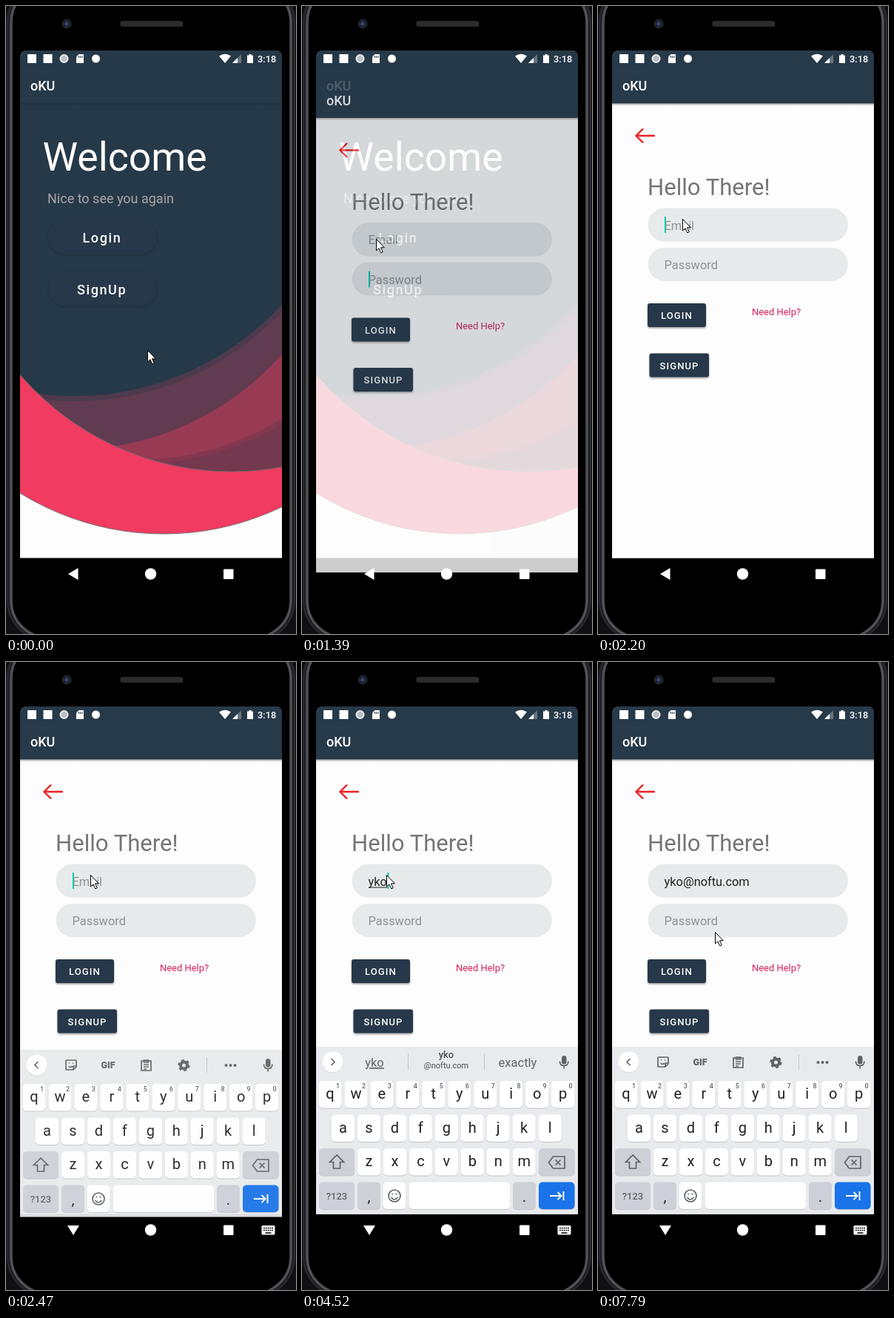
Recreate the animation shown at these times as an HTML page. Size 392 by 847 pixels, loop 8000 ms.

```html
<!DOCTYPE html>
<html lang="en">
<head>
<meta charset="utf-8">
<title>Login screen</title>
<style>
  html, body { margin: 0; width: 100%; height: 100%; overflow: hidden; background: #000; }
  svg { display: block; width: 100vw; height: 100vh; }
  text { font-family: Roboto, sans-serif; white-space: pre; }
  .mid { text-anchor: middle; }
  .med { font-weight: 500; }
  .caps { font-size: 13px; font-weight: 500; letter-spacing: 1.1px; fill: #fff; }
  .pill { font-size: 18px; font-weight: 500; letter-spacing: 1.6px; fill: #fff; }
  .field { font-size: 16.4px; }
  .hint { fill: #8f9394; }
  .key { font-size: 20px; fill: #202124; text-anchor: middle; }
  .digit { font-size: 9px; fill: #5f6368; text-anchor: middle; font-weight: 500; }
  .word { font-size: 16.5px; fill: #5f6368; text-anchor: middle; }
  .line { fill: none; stroke: #5f6368; stroke-width: 1.7; }
</style>
</head>
<body>
<svg viewBox="0 0 392 847">
  <defs>
    <clipPath id="screen"><path d="M19 744.500V70q0-10 10-10h334q10 0 10 10v674.500z"/></clipPath>
    <clipPath id="bowl"><circle cx="305" cy="250" r="378"/></clipPath>
    <linearGradient id="shade" x2="0" y2="1">
      <stop stop-color="#000" stop-opacity=".3"/><stop offset="1" stop-color="#000" stop-opacity="0"/>
    </linearGradient>
    <filter id="drop" x="-10%" y="-20%" width="120%" height="160%">
      <feDropShadow dx="0" dy="1.5" stdDeviation="1.2" flood-opacity=".4"/>
    </filter>
    <filter id="faint" x="-10%" y="-20%" width="120%" height="160%">
      <feDropShadow dx="0" dy=".7" stdDeviation=".8" flood-opacity=".28"/>
    </filter>
  </defs>

  <!-- phone body -->
  <rect width="392" height="847" fill="#101014"/>
  <rect x="2" y="-32" width="388" height="888" rx="54" fill="#1d1d22" stroke="#2a2a30" stroke-width="2"/>
  <rect x="7" y="-28" width="378" height="880" rx="50" fill="#000" stroke="#505057" stroke-width="3.500"/>
  <circle cx="82" cy="24" r="6" fill="#1b2130" stroke="#2b2d35"/>
  <circle cx="82" cy="24" r="2.500" fill="#34486b"/>
  <rect x="154.500" y="20" width="85" height="8" rx="3.500" fill="#2b2b2d"/>

  <!-- welcome -->
  <g clip-path="url(#screen)">
    <rect x="19" y="60" width="354" height="685" fill="#fdfdfd"/>
    <circle cx="213" cy="342.400" r="369.600" fill="#f23b60" stroke="#777"/>
    <g clip-path="url(#bowl)">
      <rect x="19" y="60" width="354" height="685" fill="#74384f"/>
      <circle cx="176" cy="234" r="384" fill="#83384f"/>
      <circle cx="176" cy="234" r="378" fill="#983a54"/>
      <circle cx="89" cy="220" r="378" fill="#613b4f"/>
      <circle cx="93" cy="148" r="385" fill="#4d3a4d"/>
      <circle cx="93" cy="148" r="378" fill="#263948"/>
    </g>
    <circle cx="305" cy="250" r="378" fill="none" stroke="#6f6670"/>
    <rect x="19" y="131" width="354" height="4" fill="url(#shade)" opacity=".6"/>
    <text class="med" x="33" y="114" font-size="18" fill="#fff">oKU</text>
    <text x="49.500" y="222" font-size="53.600" fill="#fff">Welcome</text>
    <text x="56" y="266" font-size="18" fill="#aaa4a6">Nice to see you again</text>
    <g fill="#263948" filter="url(#faint)">
      <rect x="57" y="288" width="147" height="47" rx="23"/>
      <rect x="57" y="358" width="147" height="47" rx="23"/>
    </g>
    <rect id="ripple" x="57" y="288" width="147" height="47" rx="23" fill="#fff"/>
    <text class="pill" x="103.500" y="319">Login</text>
    <text class="pill" x="96" y="389">SignUp</text>
  </g>

  <!-- login form -->
  <g id="form">
    <rect x="19" y="131" width="354" height="613.500" fill="#fdfdfd"/>
    <path d="M19 131.500V70q0-10 10-10h334q10 0 10 10v61.500z" fill="#273a4a"/>
    <rect x="19" y="131.500" width="354" height="3.500" fill="url(#shade)"/>
    <text class="med" x="33" y="114" font-size="18" fill="#fff">oKU</text>
    <path d="M77 175H51.500M61 165.500l-9.500 9.500 9.500 9.500" fill="none" stroke="#ee2024" stroke-width="2.400"/>
    <text x="67" y="255" font-size="31.100" fill="#757575">Hello There!</text>
    <g fill="#e7eaeb">
      <rect x="67.500" y="272.500" width="270.500" height="45.500" rx="22.700"/>
      <rect x="67.500" y="326" width="270.500" height="45" rx="22.500"/>
    </g>
    <text id="emailHint" class="field hint" x="89.500" y="301.500">Email</text>
    <text class="field hint" x="89.500" y="355">Password</text>
    <text id="email" class="field" x="89.500" y="301.500" fill="#212121"></text>
    <rect id="underline" x="90" y="303.500" height="1" fill="#212121"/>
    <rect id="caret" width="2" height="22" fill="#0fc9ae"/>
    <g fill="#263948" filter="url(#drop)">
      <rect x="67" y="401" width="79" height="32" rx="3"/>
      <rect x="69.500" y="468.500" width="80.500" height="32" rx="3"/>
    </g>
    <text class="caps" x="85" y="422">LOGIN</text>
    <text class="caps" x="83.500" y="489.500">SIGNUP</text>
    <text x="208" y="416.500" font-size="12.950" fill="#d6215f">Need Help?</text>
  </g>

  <!-- keyboard -->
  <g id="keyboard">
    <rect x="19" y="519" width="354" height="225.500" fill="#e8eaed"/>
    <circle cx="41.500" cy="540.500" r="14" fill="#d3d5d9"/>
    <circle cx="41.500" cy="539.500" r="14" fill="#fff"/>
    <path id="chevron" class="line"/>
    <g id="tools">
      <path class="line" d="M82 533h12q1 0 1 1v8l-4 4h-9q-1 0-1-1v-11q0-1 1-1zM95 541h-4v5M84.500 541q3 3 5 0M85 537h1M90 537h1"/>
      <text class="mid" x="138" y="544" font-size="12.500" font-weight="900" fill="#5f6368">GIF</text>
      <path class="line" d="M183 534h13v13h-13zM186.500 533h6v3h-6zM186 539h7M186 542h7M186 545h4"/>
      <circle cx="240.500" cy="540" r="4.500" fill="none" stroke="#5f6368" stroke-width="4"/>
      <circle cx="240.500" cy="540" r="6.800" fill="none" stroke="#5f6368" stroke-width="2.600" stroke-dasharray="3.560"/>
      <path d="M271.500 529v21" stroke="#c4c7cc"/>
      <g fill="#5f6368"><circle cx="297.500" cy="540" r="2"/><circle cx="303.500" cy="540" r="2"/><circle cx="309.500" cy="540" r="2"/></g>
    </g>
    <g id="suggestions">
      <path d="M143.500 528v22M246.500 528v22" stroke="#c4c7cc"/>
      <text id="left" class="word" x="98" y="546" text-decoration="underline"></text>
      <text id="center" class="word" x="195" y="546"></text>
      <g id="address" class="mid" fill="#4a4d51">
        <text class="med" x="195" y="533.500" font-size="13">yko</text>
        <text x="195" y="548" font-size="11">@noftu.com</text>
      </g>
      <text id="right" class="word" x="291.500" y="546"></text>
    </g>
    <rect x="351" y="531" width="6.500" height="11.500" rx="3.200" fill="#5f6368"/>
    <path class="line" d="M348.500 538.500q0 6 5.700 6t5.700-6M354.200 544.500v4"/>
    <g id="keys"></g>
    <path class="line" d="M47 665l-9.500 9.500h5v8.500h9v-8.500h5z"/>
    <path class="line" d="M333.500 675l6-8h15.500v16h-15.500zM342.500 671.500l7 7m0-7l-7 7"/>
    <text class="mid" x="47" y="725" font-size="13" font-weight="500" fill="#5f6368">?123</text>
    <text class="key" x="90.500" y="728">,</text>
    <text class="key" x="300.500" y="728">.</text>
    <circle class="line" cx="125" cy="720" r="8"/>
    <path class="line" d="M120.500 722q4.500 6 9 0M121.500 717.500h2M126.500 717.500h2"/>
    <path d="M335 720h15M345.500 715l5 5-5 5M353.500 714v12" fill="none" stroke="#fff" stroke-width="1.900"/>
  </g>

  <!-- status and navigation bars -->
  <g fill="#fff">
    <rect x="29" y="65" width="12" height="12"/>
    <rect x="50.500" y="65" width="12" height="12"/>
    <circle cx="78.500" cy="71" r="5" fill="#b9c0c5" stroke="#e9ecee" stroke-width="2"/>
    <path d="M98.500 65h6.500v12h-10v-8.500z"/>
    <path d="M98.500 67v3M100.700 67v3M102.900 67v3" stroke="#263948"/>
    <circle cx="121.500" cy="71" r="5.500"/>
    <path d="M288 67.500q8-5.500 16 0l-8 9.500z"/>
    <path d="M306 77l12-12v12z" opacity=".3"/>
    <path d="M306 77l7-7v7z"/>
    <path d="M326 66.500h2.500V65h3v1.500h2.500V77h-8z"/>
    <text class="med" x="340" y="75.500" font-size="12.800">3:18</text>
    <path id="back"/>
    <circle cx="195.500" cy="766" r="7.700"/>
    <rect x="294" y="759.500" width="13.500" height="13.500" rx="1"/>
    <g id="imeIcon">
      <rect x="345.500" y="760" width="18" height="12.500" rx="1.500"/>
      <path d="M348 763.500h13M348 766.500h13" stroke="#000" stroke-width="1.700" stroke-dasharray="1.800 1"/>
      <path d="M350.500 770h8" stroke="#000" stroke-width="1.500"/>
    </g>
  </g>
  <path id="mouse" d="M.5.500v15.500l3.500-3.300 2.700 6.200 2.500-1.200-2.700-5.900h4.800z" fill="#fff" stroke="#000"/>
</svg>

<script>
const LOOP = 8000;
const $ = id => document.getElementById(id);
const set = (id, attrs) => {
  for (const name in attrs) $(id).setAttribute(name, attrs[name]);
};
const show = (id, on) => { $(id).style.display = on ? "" : "none"; };

// Last entry whose start time has passed
const at = (track, t) => track.reduce((hit, step) => step[0] <= t ? step : hit, track[0]);

function addKey(x, y, width, fill, label, digit) {
  const rect = (dy, color) =>
    `<rect x="${x}" y="${y + dy}" width="${width}" height="36.5" rx="5" fill="${color}"/>`;
  let markup = rect(1, "#c3c6cb") + rect(0, fill);
  const mid = x + width / 2;
  if (label) markup += `<text class="key" x="${mid}" y="${y + 24}">${label}</text>`;
  if (digit !== undefined) markup += `<text class="digit" x="${mid + 10.5}" y="${y + 9.5}">${digit}</text>`;
  $("keys").insertAdjacentHTML("beforeend", markup);
}
const GRAY = "#cdd0d6", WHITE = "#fff";
[["qwertyuiop", 22.5, 565], ["asdfghjkl", 40, 610.5], ["zxcvbnm", 75, 656]].forEach(([row, x, y], r) =>
  [...row].forEach((c, i) => addKey(x + i * 34.95, y, 31, WHITE, c, r ? undefined : (i + 1) % 10)));
addKey(23, 656, 48, GRAY);
addKey(320, 656, 48.5, GRAY);
[[23, 48, GRAY], [75, 31, GRAY], [109.5, 31, WHITE], [144.5, 136.5, WHITE], [285, 31, GRAY], [320, 48.5, "#1a73e8"]]
  .forEach(([x, width, fill]) => addKey(x, 701.5, width, fill));

const mousePath = [
  [0, 191, 464], [270, 181, 449], [410, 152, 405], [550, 120, 349], [700, 104, 321], [840, 100, 314],
  [1660, 102, 309], [1800, 107, 299], [1930, 112, 291], [2050, 114, 287],
  [7520, 119, 296], [7650, 145, 344], [7790, 158, 364]
];
const pressTrack = [[0, 0], [1120, .06], [1260, .1], [1390, 0]];
const formTrack = [[0, 0, 19.5], [1390, .81, 19.5], [1510, 1, .7], [1660, 1, 0]];
const keyboardTrack = [[0, 0, 24], [2350, .6, 20], [2470, .94, 4], [2620, 1, 0]];
const ADDRESS = "yko@noftu.com";
const typing = [
  [0, 0], [3110, 1], [4000, 2], [4240, 3], [5080, 4], [5470, 5], [5640, 6], [5840, 8],
  [6140, 9], [6700, 10], [6840, 11], [6980, 12], [7120, 13]
];
const wordTrack = [
  [0], [3420, "y", "you", "yes"], [4120, "yk", "you", "yeah"],
  [4520, "yko", "", "exactly"], [5200]
];

function render(t) {
  const [, mouseX, mouseY] = at(mousePath, t);
  set("mouse", { transform: `translate(${mouseX} ${mouseY})` });
  set("ripple", { opacity: at(pressTrack, t)[1] });

  const [, formAlpha, formY] = at(formTrack, t);
  set("form", { opacity: formAlpha, transform: `translate(0 ${formY})` });

  const count = at(typing, t)[1];
  $("email").textContent = ADDRESS.slice(0, count);
  show("emailHint", !count);
  const width = count ? $("email").getComputedTextLength() : 0;
  const inEmail = t >= 2200;
  set("caret", { x: 90 + width, y: inEmail ? 284 : 338 });
  show("caret", t < 7520);
  set("underline", { width: t >= 3700 && count < 4 ? width : 0 });

  const [, keyAlpha, keyY] = at(keyboardTrack, t);
  set("keyboard", { opacity: keyAlpha, transform: `translate(0 ${keyY})` });
  const [, left, center, right] = at(wordTrack, t);
  show("tools", !left);
  show("suggestions", left);
  show("address", left === "yko");
  $("left").textContent = left || "";
  $("center").textContent = center || "";
  $("right").textContent = right || "";
  set("chevron", { d: left ? "M39.500 535l4.500 4.500-4.500 4.500" : "M43.500 535l-4.500 4.500 4.500 4.500" });

  const typingMode = t >= 2350;
  set("back", { d: typingMode ? "M83 760h16l-8 13z" : "M84 766l13.500-8v16z" });
  show("imeIcon", typingMode);
}

function tick() {
  render(performance.now() % LOOP);
  requestAnimationFrame(tick);
}
tick();
</script>
</body>
</html>
```
